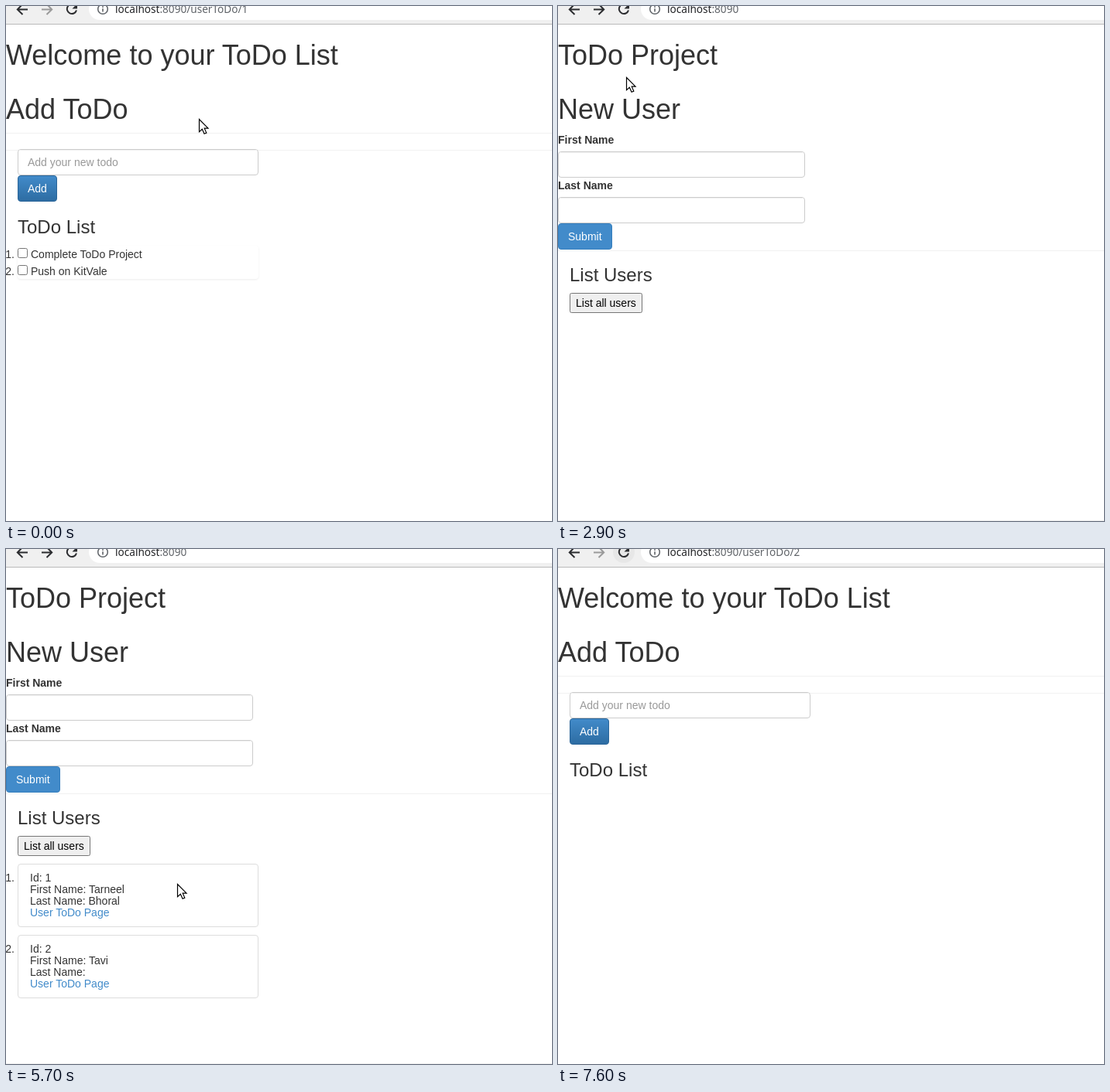
These frames come from a looping animation (705x666 px, 7.9 s). An HTML page:

```html
<!DOCTYPE html>
<html lang="en">
<head>
<meta charset="utf-8">
<title>ToDo demo</title>
<style>
  html, body { margin: 0; width: 100%; height: 100%; overflow: hidden; background: #fff; }
  svg { display: block; width: 705px; height: 666px; }
  text { font: 14px "Liberation Sans", Arial, sans-serif; fill: #333; white-space: pre; }
  .h1 { font-size: 36px; }
  .h3 { font-size: 24px; }
  .bold { font-weight: bold; }
  .hint { fill: #999; }
  .light { fill: #fff; }
  .black { fill: #000; }
  .link { fill: #428bca; }
  .link.hover { fill: #2a6496; text-decoration: underline; }
  .url { font: 13.6px "Noto Sans", "Open Sans", sans-serif; fill: #5f6368; }
  .host { fill: #202124; }
  .status { font: 12.8px "Noto Sans", "Open Sans", sans-serif; fill: #5f6368; }
  .icon { fill: none; stroke: #2b2c2f; stroke-width: 2; }
  .shadow { filter: drop-shadow(0 1px 1px rgba(0, 0, 0, .075)); }
</style>
</head>
<body>
<svg id="stage" viewBox="0 0 705 666">
  <defs>
    <linearGradient id="blue" x2="0" y2="1">
      <stop stop-color="#428bca"/><stop offset="1" stop-color="#2d6ca2"/>
    </linearGradient>
  </defs>
  <rect width="705" height="666" fill="#fff"/>
  <g id="todoPage"></g>
  <g id="userPage"></g>
  <g id="status">
    <path d="M-1 658.5H167a3.5 3.5 0 0 1 3.5 3.5V668H-1Z" fill="#f0f0f0" stroke="#d3d3d3"/>
    <text class="status" x="3" y="673">localhost:8090/userToDo/2</text>
  </g>
  <g id="toolbar">
    <rect width="705" height="23" fill="#f0f0f0"/>
    <rect y="23" width="705" height="1" fill="#b9b9b9"/>
    <circle id="halo" cy="4" r="14"/>
    <path class="icon" d="M28 4.5H15M21.5-2.5L14.8 4.5L21.5 11"/>
    <path class="icon" id="forward" d="M46 4.5H59M52.5-2.5L59.2 4.5L52.5 11"/>
    <g id="reload">
      <path class="icon" d="M89.5-.5A6.2 6.2 0 1 0 91 5.5"/>
      <path d="M92-3V3.5H85.5Z" fill="#2b2c2f"/>
    </g>
    <path class="icon" id="cancel" d="M79.5-1L90.5 10M90.5-1L79.5 10"/>
    <rect x="107" y="-10" width="640" height="28" rx="14" fill="#fff"/>
    <circle cx="125" cy="4" r="6.3" fill="none" stroke="#5f6368" stroke-width="1.5"/>
    <path d="M125 .3V1.9M125 3.2V7.6" stroke="#5f6368" stroke-width="1.6"/>
    <text class="url" x="141" y="9"><tspan class="host">localhost</tspan>:8090<tspan id="path"></tspan></text>
  </g>
  <g id="cursor">
    <path id="arrow" d="M.5 .5V16.6L4.3 13.2L7 19.3L9.8 18.1L7.2 12.2H12Z" fill="#fff" stroke="#000" stroke-width="1.2"/>
    <path id="hand" d="M-1.3 9V1Q-1.2-.5.1-.5T1.5 1V6Q3.6 4.8 4.5 6.6Q6.4 5.7 7.3 7.3Q10.3 6.6 10.3 9.2V12.5Q10.3 14 9.3 15.5V16.5H.3V15.2L-4.2 10.4Q-5.3 8.2-3.3 7.8Z M1.5 6V9M4.5 6.6V9.3M7.3 7.3V9.6" fill="#fff" stroke="#000" stroke-width="1.2"/>
    <path id="beam" d="M-3.5-8.5H-1Q0-8.5 0-7.5Q0-8.5 1-8.5H3.5M0-8V9M-3.5 9.5H-1Q0 9.5 0 8.5Q0 9.5 1 9.5H3.5" fill="none" stroke="#222" stroke-width="1.2"/>
  </g>
</svg>
<script>
const LOOP = 7900, STEP = 100;
const $ = id => document.getElementById(id);

const text = (x, y, value, cls = "", id = "") =>
  `<text x="${x}" y="${y}" class="${cls}" id="${id}">${value}</text>`;
const box = (x, y, w, h, fill, stroke, r = 4, id = "") =>
  `<rect x="${x + .5}" y="${y + .5}" width="${w - 1}" height="${h - 1}" rx="${r - .5}" fill="${fill}" stroke="${stroke}" id="${id}"/>`;
const rule = y => `<rect y="${y}" width="705" height="1" fill="#f1f1f1"/>`;
const field = (x, y, w) => box(x, y, w, 34, "#fff", "#ccc") +
  `<rect x="${x + 2}" y="${y + 1}" width="${w - 4}" height="1" fill="#f1f1f1"/>`;
const headings = (first, second) => text(0, 76, first, "h1") + text(0, 146, second, "h1");

const task = (n, label) => {
  const y = 304 + 22 * n;
  return text(-.7, y, n + ".") + box(15, y - 13, 13, 13, "#fff", "#767676", 2.5) + text(32, y, label);
};

const userCard = (n, first, last) => {
  const y = 315 + 92 * n;
  return box(15, y, 311, 82, "#fff", "#ddd") + text(-.7, y + 23, n + ".") +
    text(31, y + 23, "Id: " + n) +
    text(31, y + 38, "First Name: " + first) +
    text(31, y + 53, "Last Name: " + last) +
    text(31, y + 68, "User ToDo Page", "link", "link" + n);
};

$("todoPage").innerHTML =
  headings("Welcome to your ToDo List", "Add ToDo") + rule(164) + rule(186) +
  field(15, 185, 311) + text(28, 207, "Add your new todo", "hint") +
  box(15, 219, 51, 34, "url(#blue)", "#2b669a") + text(28, 241, "Add", "light") +
  text(15, 294, "ToDo List", "h3") +
  `<g id="tasks"><rect class="shadow" x="15" y="310" width="311" height="43" rx="4" fill="#fff"/>` +
  task(1, "Complete ToDo Project") + task(2, "Push on KitVale") + "</g>";

$("userPage").innerHTML =
  headings("ToDo Project", "New User") +
  text(0, 178, "First Name", "bold") + field(0, 188, 319) +
  text(0, 237, "Last Name", "bold") + field(0, 247, 319) +
  box(0, 281, 70, 34, "#428bca", "#357ebd") + text(13, 303, "Submit", "light") +
  rule(316) + text(15, 356, "List Users", "h3") +
  box(15, 371, 94, 26, "#efefef", "#767676", 2.5, "listButton") +
  text(23, 389, "List all users", "black") +
  `<g id="users">${userCard(1, "Tarneel", "Bhoral")}${userCard(2, "Tavi", "")}</g>` + rule(665);

// Pointer moves: start time, number of steps, end x, end y
const moves = [
  [700, 6, 16, 2], [1900, 3, 224, 125], [2900, 1, 88, 92], [3000, 1, 77, 65],
  [3400, 4, 26, 2], [4300, 2, 173, 205], [4500, 1, 151, 342], [4900, 2, 81, 385],
  [5500, 1, 163, 381], [5700, 1, 221, 433], [5800, 3, 118, 541],
  [6300, 2, 89, 552], [7000, 3, 80, 29], [7400, 1, 60, 18], [7500, 1, 74, 3], [7600, 1, 80, -40]
];

function pointerAt(t) {
  let x = 249, y = 146;
  for (const [start, steps, toX, toY] of moves) {
    if (t < start) break;
    const p = Math.min(1, (Math.floor((t - start) / STEP) + 1) / steps);
    const eased = p * p * (3 - 2 * p);
    x += (toX - x) * eased;
    y += (toY - y) * eased;
  }
  return [x, y];
}

const show = (id, on) => $(id).setAttribute("display", on ? "inline" : "none");

function render(t) {
  const during = (from, to) => t >= from && t < to;
  const onUsers = during(1800, 6900);
  show("userPage", onUsers);
  show("todoPage", !onUsers);
  show("tasks", t < 1800);
  show("users", t >= 5300);
  show("status", during(6400, 6900));

  const buttonHover = during(5000, 5500);
  $("listButton").setAttribute("fill", buttonHover ? "#e5e5e5" : "#efefef");
  $("listButton").setAttribute("stroke", buttonHover ? "#4f4f4f" : "#767676");
  $("link2").classList.toggle("hover", during(6400, 6900));

  const loading = during(1600, 1900) || during(6600, 7200);
  show("cancel", loading);
  show("reload", !loading);
  $("forward").style.stroke = during(1600, 6800) ? "#2b2c2f" : "#9a9a9a";
  $("path").textContent = t < 1600 ? "/userToDo/1" : t < 6800 ? "" : "/userToDo/2";

  const pressed = during(1400, 1900);
  show("halo", during(1200, 1900) || during(3700, 4300) || t >= 7500);
  $("halo").setAttribute("cx", t >= 7500 ? 85 : 21);
  $("halo").setAttribute("fill", pressed ? "#d6d6d6" : "#e7e7e7");

  const hand = during(5000, 5500) || during(6400, 6800);
  const beam = during(3000, 3400);
  show("hand", hand);
  show("beam", beam);
  show("arrow", !hand && !beam);
  const [x, y] = pointerAt(t);
  $("cursor").setAttribute("transform", `translate(${Math.round(x)} ${Math.round(y)})`);
}

const origin = performance.now();
function tick() {
  render((performance.now() - origin) % LOOP);
  requestAnimationFrame(tick);
}
tick();
</script>
</body>
</html>
```
